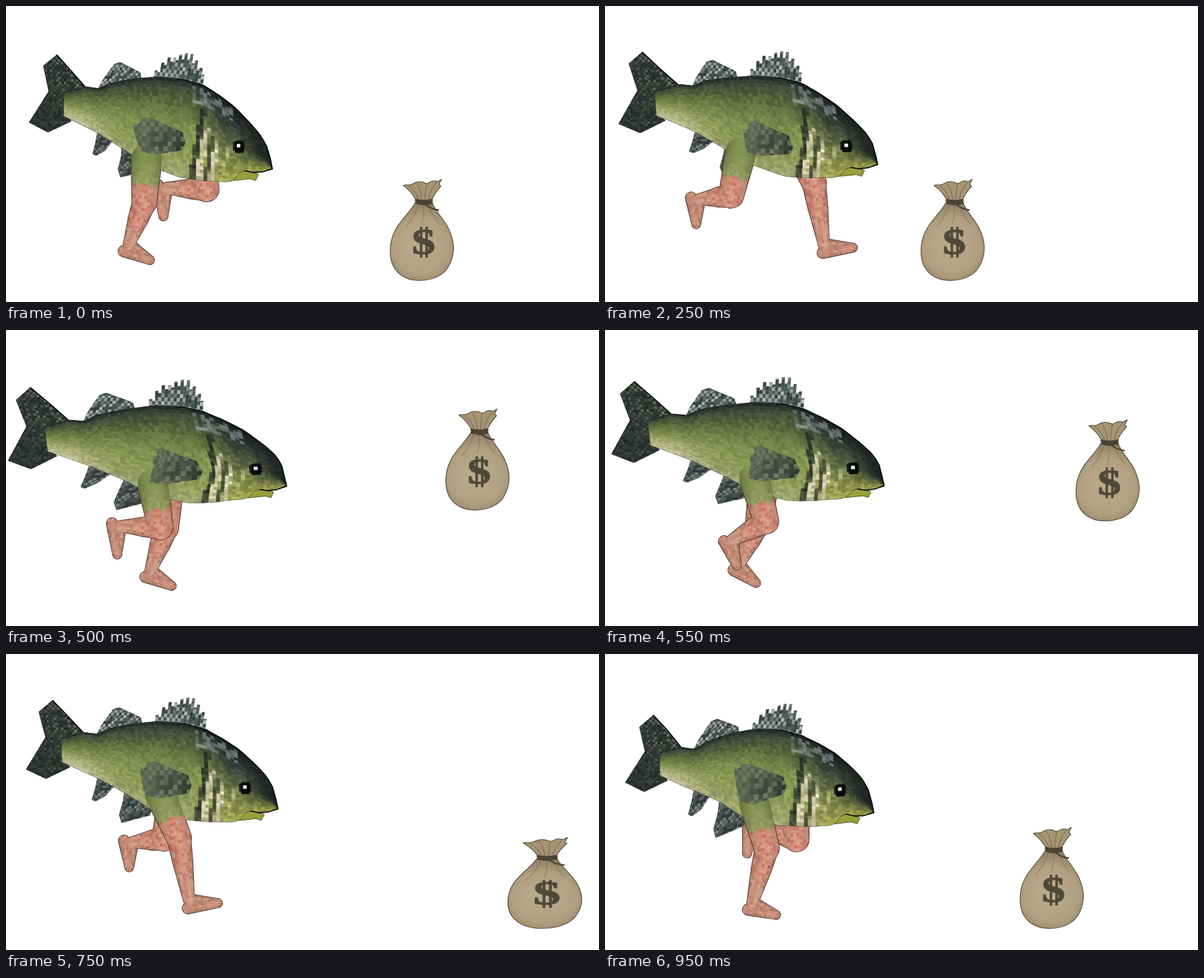
These frames come from a looping animation (960x480 px, 1 s). An HTML page with a canvas:

```html
<!DOCTYPE html>
<html lang="en">
<head>
<meta charset="utf-8">
<title>Running fish</title>
<style>
html, body { margin: 0; width: 100%; height: 100%; overflow: hidden; background: #fff; }
canvas { display: block; }
</style>
</head>
<body>
<canvas id="stage" width="960" height="480"></canvas>
<script>
const STEP = 50, STEPS = 20, LOOP = 1000;
const stage = document.getElementById('stage').getContext('2d');
let g;

// ---------- key poses: time, then coordinates ----------
// tail tip, crest, snout
const BODY = [
  [0, 82,79, 319,128, 431,264], [150, 80,57, 320,123, 433,266],
  [350, 40,95, 316,128, 450,248], [500, 39,93, 319,132, 454,253],
  [650, 68,62, 327,117, 444,250], [750, 75,75, 323,122, 440,251],
  [950, 78,99, 318,132, 435,257]
];
// knee, ankle, toe; the far leg runs half a loop later
const STRIDE = [
  [0, 224,318, 199,386, 233,412], [150, 203,300, 161,355, 174,395],
  [350, 214,318, 156,281, 136,321], [500, 250,320, 186,318, 180,364],
  [650, 279,288, 256,385, 292,413], [750, 280,298, 296,398, 343,404],
  [850, 263,304, 247,407, 287,430], [950, 262,315, 239,402, 277,423]
];
const BAG = [[0, 673], [150, 562], [350, 602], [500, 763], [650, 893], [750, 872], [950, 723]];

// ---------- helpers ----------
const hash = (a, b) => { const s = Math.sin(a * 127.1 + b * 311.7) * 43758.5453; return s - Math.floor(s); };
const clamp = (v, a = 0, b = 1) => Math.max(a, Math.min(b, v));
const mix = (a, b, k) => a.map((v, i) => v + (b[i] - v) * k);
const rgb = (c, k = 1) => `rgb(${c.map(v => Math.round(clamp(v * k, 0, 255))).join()})`;
const pairs = a => Array.from({ length: a.length / 2 }, (_, i) => [a[2 * i], a[2 * i + 1]]);
const add = (p, x, y) => [p[0] + x, p[1] + y];
const wave = (t, peak) => Math.cos((t - peak) / LOOP * 2 * Math.PI);

function ramp(stops, v) {
  const i = Math.max(1, stops.findIndex(s => v <= s[0]));
  const [a, ca] = stops[i - 1], [b, cb] = stops[i];
  return mix(ca, cb, clamp((v - a) / (b - a)));
}

// smooth periodic interpolation between key poses
function pose(rows, t) {
  const n = rows.length, row = j => rows[(j + n) % n];
  const at = j => row(j)[0] + LOOP * Math.floor(j / n);
  let i = n - 1;
  while (rows[i][0] > t) i--;
  const d = at(i + 1) - at(i), u = (t - at(i)) / d, u2 = u * u, u3 = u2 * u;
  const slope = (j, c) => (row(j + 1)[c] - row(j - 1)[c]) / (at(j + 1) - at(j - 1)) * d;
  return rows[0].map((_, c) => (2 * u3 - 3 * u2 + 1) * row(i)[c] + (u3 - 2 * u2 + u) * slope(i, c)
    + (3 * u2 - 2 * u3) * row(i + 1)[c] + (u3 - u2) * slope(i + 1, c)).slice(1);
}

// landmarks of the fish; yaw turns it between foreshortened and side-on
function landmarks(t) {
  const [tail, crest, snout] = pairs(pose(BODY, t)), yaw = wave(t, 425);
  const back = add(tail, 79 + 11 * yaw, 56), pelvic = add(back, 3 * yaw, 109);
  return [
    tail, crest, snout, back, pelvic,
    add(tail, -41 + 5 * yaw, 114 + 5 * yaw),
    add(crest, -32 - 4 * yaw, -52),
    add(snout, -52 + 3 * yaw, 30 * -1 - -5 * yaw),
    add(snout, -72, 24),
    add(snout, -140 + 3 * yaw, -33 + 11 * yaw),
    add(snout, -217 + 7 * yaw, -52 + 14 * yaw),
    add(pelvic, 46 + 7 * yaw, 33)
  ];
}
const REST = landmarks(0);

// moving least squares: bends the rest shape so that it follows the landmarks
function makeWarp(t) {
  const q = landmarks(t);
  return ([x, y]) => {
    let W = 0, px = 0, py = 0, qx = 0, qy = 0;
    const w = REST.map((a, i) => {
      const k = 1 / ((a[0] - x) ** 2 + (a[1] - y) ** 2 + 60);
      W += k; px += k * a[0]; py += k * a[1]; qx += k * q[i][0]; qy += k * q[i][1];
      return k;
    });
    px /= W; py /= W; qx /= W; qy /= W;
    let xx = 0, xy = 0, yy = 0, xu = 0, xv = 0, yu = 0, yv = 0;
    REST.forEach((a, i) => {
      const dx = a[0] - px, dy = a[1] - py, u = q[i][0] - qx, v = q[i][1] - qy, k = w[i];
      xx += k * dx * dx; xy += k * dx * dy; yy += k * dy * dy;
      xu += k * dx * u; xv += k * dx * v; yu += k * dy * u; yv += k * dy * v;
    });
    const det = xx * yy - xy * xy;
    const a = ((x - px) * yy - (y - py) * xy) / det, b = ((y - py) * xx - (x - px) * xy) / det;
    return [qx + a * xu + b * yu, qy + a * xv + b * yv];
  };
}

function trace(pts) {
  g.beginPath();
  pts.forEach(p => g.lineTo(p[0], p[1]));
}
function fillPoly(pts, color, edge = color, width = 0.7) {
  trace(pts);
  g.closePath();
  g.fillStyle = color; g.fill();
  g.strokeStyle = edge; g.lineWidth = width; g.stroke();
}
function line(pts, color, width) {
  trace(pts);
  g.strokeStyle = color; g.lineWidth = width; g.stroke();
}

// ---------- fish ----------
const BACK = pairs([94,140, 128,131, 150,134, 170,125, 200,119, 245,115, 290,120, 320,129,
  345,145, 370,164, 395,190, 412,210, 425,233, 431,264]);
const BELLY = pairs([94,178, 106,184, 150,206, 200,238, 230,258, 280,277, 320,283, 360,285, 395,272, 431,265]);
const TAIL = pairs([82,79, 60,97, 69,138, 37,189, 68,205, 106,187, 95,165, 100,140, 128,131]);
const REAR_FIN = pairs([148,136, 155,122, 175,94, 185,91, 218,108, 219,120]);
const PELVIC = pairs([148,202, 172,220, 160,235, 146,243, 140,240, 145,220]);
const ANAL = pairs([187,228, 232,250, 228,268, 205,273, 185,278, 181,265, 186,245]);
const SIDE_FIN = pairs([206,193, 217,190, 219,183, 232,180, 286,205, 290,222, 286,234, 240,241, 218,235, 208,208]);
const SPINES = pairs([230,114, 240,100, 255,84, 270,78, 292,75, 305,94, 319,108]);
const LIP = pairs([368,283, 378,270, 388,267, 409,273, 404,283, 395,280, 378,282]);

function curve(pts, x) {
  const i = Math.max(1, pts.findIndex(p => p[0] >= x));
  const [a, b] = [pts[i - 1], pts[i]];
  return a[1] + (b[1] - a[1]) * clamp((x - a[0]) / (b[0] - a[0]));
}

const FLANK = [[0, [30,38,34]], [.07, [62,72,58]], [.25, [94,106,62]], [.48, [126,141,78]], [.78, [144,157,88]], [1, [160,165,114]]];
const HEAD = [[0, [22,28,29]], [.25, [50,59,52]], [.48, [92,102,70]], [.75, [130,140,74]], [1, [166,168,82]]];

function skin(x, y, v, r) {
  let c = mix(ramp(FLANK, v), ramp(HEAD, v), clamp((x - 300) / 55));
  if (x < 175) c = mix(c, [198,196,158], clamp((175 - x) / 50) * clamp((v - .5) * 1.7));
  if (x > 300 && x < 365 && v > .04 && v < .2 && r > .4) c = mix(c, [150,166,172], .5);
  if (x > 365) c = mix(c, [32,38,35], clamp((x - 365) / 45) * clamp((.92 - v) * 2.5));
  const d = x - 318 + (y - 165) * .17;
  const stripe = (from, to, top, color, k) => { if (y > top && d > from && d < to) c = mix(c, color, k); };
  stripe(-6, 4, 163, [38,44,40], .5 + .45 * r);
  stripe(4, 15, 195, [222,210,184], .4 + .5 * r);
  stripe(18, 25, 208, [54,62,46], .75);
  stripe(26, 35, 215, [224,218,188], .4 + .5 * r);
  stripe(46, 52, 225, [206,204,150], .6 * r);
  return c;
}

function drawBody(warp) {
  const rows = 28, cols = [];
  for (let x = 94; x < 431; x += x < 200 ? 4 : x < 300 ? 5 : 6) cols.push(x);
  cols.push(431);
  const grid = cols.map(x => {
    const a = curve(BACK, x), b = curve(BELLY, x);
    return Array.from({ length: rows + 1 }, (_, j) => [x, a + (b - a) * j / rows]);
  });
  const pts = grid.map(col => col.map(warp));
  const back = pts.map(col => col[0]), belly = pts.map(col => col[rows]);
  fillPoly([...back, ...belly.slice().reverse()], '#77854a', '#1f261b', 1.4);
  for (let i = 0; i < cols.length - 1; i++) {
    for (let j = 0; j < rows; j++) {
      const [x, y] = grid[i][j];
      const amp = x > 300 ? .34 : j < 8 ? .32 : .2;
      const c = skin(x, y, (j + .5) / rows, hash(i, j));
      fillPoly([pts[i][j], pts[i + 1][j], pts[i + 1][j + 1], pts[i][j + 1]],
        rgb(c, 1 - amp / 2 + amp * hash(j, i + 40)));
    }
  }
  line(back.slice(Math.floor(cols.length * .6)), '#0b0f10', 2);
}

// blocky texture inside an outline
function drawFin(warp, poly, cw, ch, lean, paint) {
  const edge = poly.map(warp);
  const xs = poly.map(p => p[0]), ys = poly.map(p => p[1]);
  const x0 = Math.min(...xs), x1 = Math.max(...xs), y0 = Math.min(...ys), y1 = Math.max(...ys);
  const pad = Math.abs(lean) * (y1 - y0);
  g.save();
  trace(edge);
  g.clip();
  for (let x = x0 - pad, i = 0; x < x1 + pad; x += cw, i++) {
    for (let y = y0, j = 0; y < y1; y += ch, j++) {
      const at = (u, v) => warp([u + (y1 - v) * lean, v]);
      fillPoly([at(x, y), at(x + cw, y), at(x + cw, y + ch), at(x, y + ch)], rgb(paint(x, i, j)));
    }
  }
  g.restore();
}

// checkered tone between a dark and a pale colour
const checks = (dark, pale, odd, even) => (x, i, j) => mix(dark, pale, hash(i, j) * ((i + j) % 2 ? odd : even));
const checker = checks([46,57,56], [176,190,184], 1, .35);
const murky = checks([42,52,52], [132,146,138], .9, .45);
const tailTone = (x, i, j) => checks([30,38,35], [122,136,120], .3 + clamp((x - 66) / 80), .25)(x, i, j);
const paddle = (x, i, j) => checks(mix([84,94,74], [34,42,40], clamp((x - 215) / 75)), [136,140,112], .75, .4)(x, i, j);

function drawSpines(warp) {
  const wide = 4.4;
  for (let x = 230, i = 0; x < 316; x += wide, i++) {
    const base = curve(BACK, x) + 4;
    const top = curve(SPINES, x) + (i % 2 ? 8 : 0) + hash(i, 5) * 5;
    for (let y = base, j = 0; y > top; y -= 6, j++) {
      const lean = v => (base - v) * .16, z = Math.max(top, y - 6);
      fillPoly([[x + lean(y), y], [x + wide + lean(y), y], [x + wide + lean(z), z], [x + lean(z), z]].map(warp),
        rgb(checker(x, i, j)), undefined, .4);
    }
  }
}

function drawFace(warp) {
  fillPoly(LIP.map(warp), '#98a03c', '#4a5122', 1);
  line(pairs([386,267, 400,270, 415,269, 431,264]).map(warp), '#10140f', 2);
  const block = (x, y, w, h, c) => fillPoly([[x, y], [x + w, y], [x + w, y + h], [x, y + h]].map(warp), c);
  block(368, 221, 18, 13, '#161a17');
  block(371, 219, 13, 19, '#080a09');
  block(374, 224, 5, 5, '#f4f6f2');
}

// ---------- legs ----------
function legJoints(t) {
  const [knee, ankle, toe] = pairs(pose(STRIDE, t % LOOP));
  return [[138 + knee[0] * .4, knee[1] - 70], knee, ankle, toe];
}

// the far leg is shifted by perspective, most when the body is turned away
function farJoints(t) {
  const turn = wave(t, 25);
  return legJoints(t + LOOP / 2).map(p => add(p, 55 + 20 * turn, -10 - 13 * turn));
}

function legParts([hip, knee, ankle, toe]) {
  const unit = (a, b) => { const l = Math.hypot(b[0] - a[0], b[1] - a[1]); return [(b[0] - a[0]) / l, (b[1] - a[1]) / l]; };
  const s = unit(knee, ankle), f = unit(ankle, toe), calf = mix(knee, ankle, .4);
  const heel = add(ankle, s[0] * 15 - f[0] * 4, s[1] * 15 - f[1] * 4);
  return [[ankle, toe, 9, 7], [heel, toe, 9, 7], [calf, ankle, 16, 9], [knee, calf, 19, 16], [hip, knee, 25, 20]];
}

function capsule([a, b, ra, rb]) {
  const ang = Math.atan2(b[1] - a[1], b[0] - a[0]), h = Math.PI / 2;
  const path = new Path2D();
  path.arc(a[0], a[1], ra, ang + h, ang + 3 * h);
  path.arc(b[0], b[1], rb, ang - h, ang + h);
  path.closePath();
  return path;
}

function outlineLeg(parts) {
  g.strokeStyle = '#3a241d';
  g.lineWidth = 1.6;
  parts.forEach(p => g.stroke(capsule(p)));
}

function fillLeg(parts, green) {
  parts.forEach((part, n) => {
    const [a, b, ra, rb] = part, thigh = n === 4;
    const len = Math.hypot(b[0] - a[0], b[1] - a[1]), r = Math.max(ra, rb);
    g.save();
    g.clip(capsule(part));
    g.translate(a[0], a[1]);
    g.rotate(Math.atan2(b[1] - a[1], b[0] - a[0]));
    const size = n < 2 ? 4 : 5;
    for (let x = -ra, i = 0; x < len + rb; x += size, i++) {
      for (let y = -r, j = 0; y < r; y += size, j++) {
        const k = hash(i + n * 17, j + 3), u = x / len;
        let c = mix(n > 2 ? [200,118,100] : [190,128,108], [228,180,156], k * .75);
        if (thigh && green && u < .5 + k * .12) c = mix([134,148,82], [184,188,124], k * .7 * clamp(u * 2));
        const s = (y + size / 2) / r;
        g.fillStyle = rgb(c, 1 - .24 * s * s);
        g.fillRect(x, y, size + .5, size + .5);
      }
    }
    g.restore();
  });
  const [ankle, toe] = parts[0];
  g.save();
  g.translate(toe[0], toe[1]);
  g.rotate(Math.atan2(toe[1] - ankle[1], toe[0] - ankle[0]));
  for (let y = -4; y <= 4; y += 4) line([[1, y], [7, y]], '#84503f', 1);
  g.restore();
}

// ---------- money bag ----------
function drawBag(t) {
  const d = t / STEP - 10;
  const floor = Math.abs(d) < 5 ? Math.min(445, 292 + 10 * d + 7.67 * d * d) : 445;
  const squashed = Math.abs(t - 150) <= 50 || Math.abs(t - 750) <= 50;
  g.save();
  g.translate(pose(BAG, t)[0], floor);
  if (squashed) g.scale(1.165, .9);
  const ink = '#5b533f';
  const shape = (d, fill, width = 1.3) => {
    const p = new Path2D(d);
    if (fill) { g.fillStyle = fill; g.fill(p); }
    g.strokeStyle = ink; g.lineWidth = width; g.stroke(p);
  };
  const cloth = g.createRadialGradient(-4, -58, 8, 0, -55, 70);
  cloth.addColorStop(0, '#baaa8c');
  cloth.addColorStop(.6, '#b09f80');
  cloth.addColorStop(1, '#8f7f63');
  shape('M-10-127C-18-111-34-99-43-81C-52-64-54-40-46-23C-37-6-20 0-4 0C14 0 34-6 43-22C54-41 53-61 46-78C40-96 24-108 17-126Z', cloth);
  shape('M-30-154C-23-157-20-152-14-157C-6-162 2-160 8-157C13-158 17-164 25-160L32-164L28-156L31-153C25-146 19-139 16-130L-9-130C-13-138-20-147-30-154Z', '#a69475');
  g.lineCap = 'round';
  shape('M-20-153Q-9-145-5-132M-8-157Q-1-146 0-132M8-157Q6-145 5-132M24-159Q14-147 11-132', null, .8);
  g.globalAlpha = .25;
  shape('M-6-121Q-12-102-25-88M3-121Q4-105 0-92M12-121Q17-105 28-92', null, 2);
  g.globalAlpha = 1;
  g.strokeStyle = '#4b4335';
  g.lineWidth = 4.5;
  g.stroke(new Path2D('M-9-130Q3-126 16-130M-8-126Q3-122 16-126'));
  g.lineWidth = 2.4;
  g.stroke(new Path2D('M5-124Q14-116 27-114'));
  g.translate(3, -43);
  g.fillStyle = g.strokeStyle = '#50493a';
  g.fillRect(-6, -44, 4, 50);
  g.fillRect(3, -44, 4, 50);
  g.scale(1.2, 1);
  g.font = 'bold 60px "Liberation Serif", "Times New Roman", serif';
  g.textAlign = 'center';
  g.lineWidth = 1;
  g.fillText('S', 0, 0);
  g.strokeText('S', 0, 0);
  g.restore();
}

// ---------- frames ----------
function render(k) {
  const canvas = document.createElement('canvas');
  canvas.width = 960;
  canvas.height = 480;
  g = canvas.getContext('2d');
  g.fillStyle = '#fff';
  g.fillRect(0, 0, 960, 480);
  g.lineJoin = 'round';
  const t = k * STEP, warp = makeWarp(t);
  const near = legParts(legJoints(t)), far = legParts(farJoints(t));

  outlineLeg(far);
  fillLeg(far, false);
  drawFin(warp, PELVIC, 4, 4, .2, murky);
  drawFin(warp, ANAL, 4, 4, .2, murky);
  drawFin(warp, REAR_FIN, 4, 4.5, .3, checker);
  drawSpines(warp);
  drawFin(warp, TAIL, 4, 4, -.15, tailTone);
  line([TAIL[0], [106, 106], TAIL[8]].map(warp), '#0e1312', 2);
  outlineLeg(near);
  drawBody(warp);
  drawFace(warp);
  fillLeg(near, true);
  drawFin(warp, SIDE_FIN, 7, 8, 0, paddle);
  drawBag(t);
  return canvas;
}

const frames = Array.from({ length: STEPS }, (_, k) => render(k));
let shown = -1;
function tick(now) {
  const k = Math.floor(now / STEP) % STEPS;
  if (k !== shown) stage.drawImage(frames[shown = k], 0, 0);
  requestAnimationFrame(tick);
}
tick(0);
</script>
</body>
</html>
```
